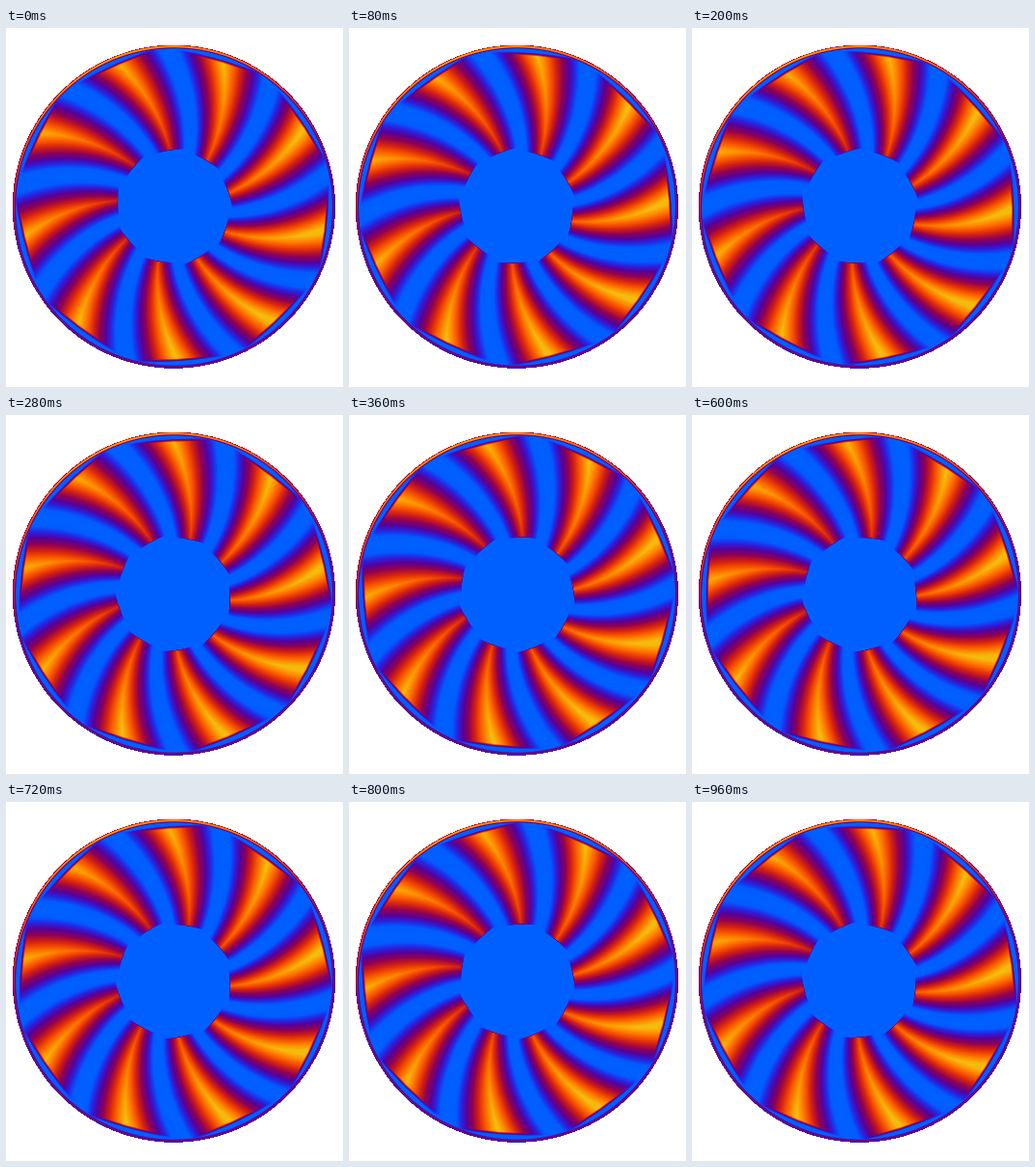
An HTML page with a canvas that plays this animation: 350x372 px, repeating every 1 s.

```html
<!DOCTYPE html>
<html lang="en">
<head>
<meta charset="utf-8">
<title>Spinning rotor field</title>
<style>
  html, body { margin: 0; width: 100%; height: 100%; overflow: hidden; background: #fff; }
  canvas { display: block; }
</style>
</head>
<body>
<canvas id="stage" width="350" height="372"></canvas>
<script>
const W = 350, H = 372, CX = 174.4, CY = 185.2, R = 167.6;
const HUB = 58.5, TIP = 159, PITCH = 40, START = 26, TWIST = 0.172;
const STEP_MS = 40, STEPS = 25;
const DEG = Math.PI / 180;

const ctx = document.getElementById('stage').getContext('2d');
const img = ctx.createImageData(W, H);
const px = new Uint32Array(img.data.buffer);
const clamp = v => Math.max(0, Math.min(1, v));

// Colour ramp: level, red, green, blue
const ramp = [
  [0, 0, 96, 255], [0.17, 0, 92, 255], [0.29, 42, 32, 222], [0.4, 88, 0, 150],
  [0.52, 140, 0, 85], [0.65, 208, 30, 20], [0.77, 246, 80, 0],
  [0.89, 255, 138, 0], [1, 244, 186, 14]
];
const lut = new Uint32Array(256);
for (let i = 0; i < 256; i++) {
  const v = i / 255;
  const k = Math.max(1, ramp.findIndex(s => s[0] >= v));
  const a = ramp[k - 1], b = ramp[k];
  const f = (v - a[0]) / (b[0] - a[0]);
  const [r, g, bl] = [1, 2, 3].map(c => Math.round(a[c] + (b[c] - a[c]) * f));
  lut[i] = (255 << 24 | bl << 16 | g << 8 | r) >>> 0;
}

// Time-independent part of every pixel in the disc
const cells = [];
px.fill(0xffffffff);
for (let y = 0; y < H; y++) {
  for (let x = 0; x < W; x++) {
    const dx = x + 0.5 - CX, dy = y + 0.5 - CY, r = Math.hypot(dx, dy);
    if (r > R) continue;
    const i = y * W + x;
    px[i] = lut[0];
    if (r < HUB - 4) continue;
    const th = Math.atan2(dy, dx) / DEG;
    const u = clamp((r - HUB) / 100);
    const gain = 0.71 + 0.31 * u ** 0.8 + 0.08 * Math.cos((th - 30) * DEG) * (1 - 0.4 * u);
    const crest = 0.5 + 0.45 * Math.max(0, Math.cos((th + 105) * DEG));
    const rim = crest * clamp(1.15 - Math.abs(r - 166) / 2.4);
    cells.push({ i, r, gain, rim, phase: th - START + TWIST * (r - HUB) });
  }
}

function draw(step) {
  const turn = step * 360 / STEPS;
  for (const c of cells) {
    const a = c.phase - turn + PITCH / 2;
    const d = a - Math.floor(a / PITCH) * PITCH - PITCH / 2;
    const inner = clamp((c.r - HUB - 0.1 * d) / 1.6 + 0.5);
    const outer = clamp((TIP / Math.cos(d * DEG) + 0.1 * d - c.r) / 4 + 0.5);
    const blade = (1 - Math.abs(d) / (PITCH / 2)) * c.gain * inner * outer;
    px[c.i] = lut[Math.round(255 * clamp(Math.max(blade, c.rim)))];
  }
  ctx.putImageData(img, 0, 0);
}

let shown = -1;
function tick() {
  const step = Math.floor(performance.now() / STEP_MS) % STEPS;
  if (step !== shown) draw(shown = step);
  requestAnimationFrame(tick);
}
tick();
</script>
</body>
</html>
```
